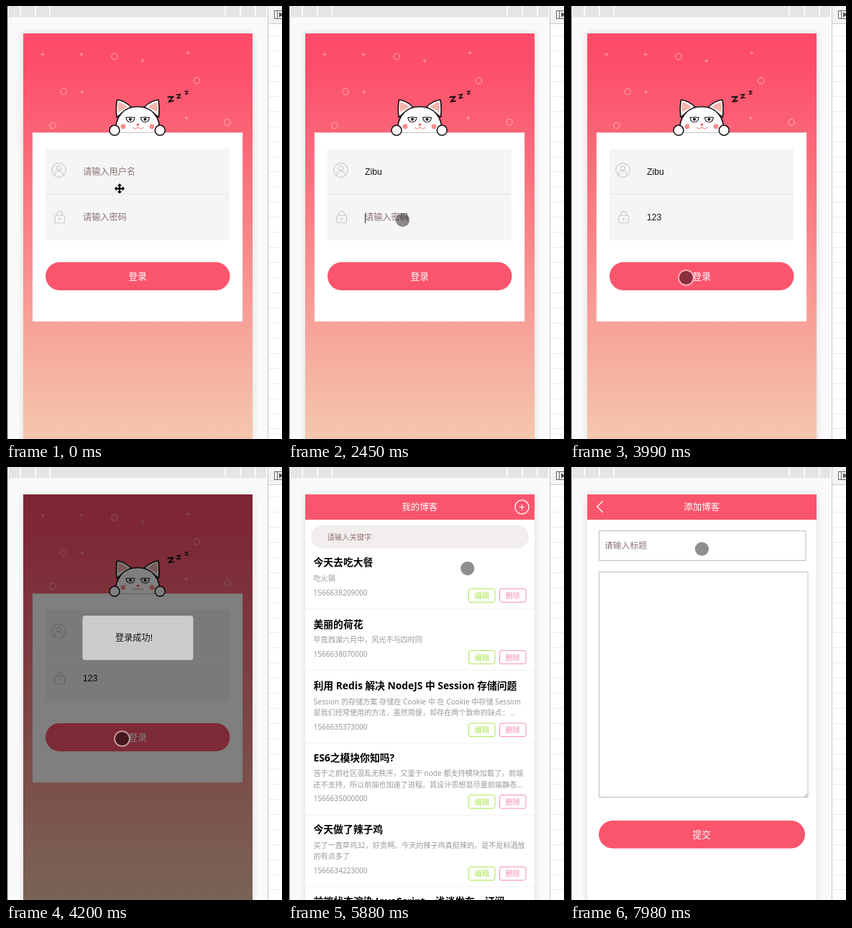
An HTML page that plays this animation: 384 by 600 pixels, repeating every 8 s.

```html
<!DOCTYPE html>
<html lang="zh-CN">
<head>
<meta charset="utf-8">
<title>登录与博客</title>
<style>
  html, body { margin: 0; width: 100%; height: 100%; overflow: hidden; background: #fafafa; }
  svg { display: block; width: 384px; height: 600px; }
  text { font-family: 'Noto Sans', 'Noto Sans CJK SC', sans-serif; white-space: pre; }
  .field { font-family: 'Liberation Sans', 'Noto Sans CJK SC', sans-serif; }
  .line { fill: none; stroke-linecap: round; stroke-linejoin: round; }
  .device { filter: drop-shadow(0 0 5px rgba(0, 0, 0, .13)); }
</style>
</head>
<body>
<svg id="stage" viewBox="0 0 384 600"></svg>
<script>
const LOOP = 8000, TICK = 70;
const RED = '#fa556d', HINT = '#8b7373';

const rect = (x, y, w, h, fill, more = '') =>
  `<rect x="${x}" y="${y}" width="${w}" height="${h}" fill="${fill}" ${more}/>`;
const line = (d, stroke, width = 1, more = '') =>
  `<path class="line" d="${d}" stroke="${stroke}" stroke-width="${width}" ${more}/>`;
const circle = (x, y, r, fill, more = '') =>
  `<circle cx="${x}" cy="${y}" r="${r}" fill="${fill}" ${more}/>`;
// Text is placed by the middle of its glyphs.
const label = (x, middle, size, fill, str, more = '') =>
  `<text x="${x}" y="${middle + size * .37}" font-size="${size}" fill="${fill}" ${more}>${str}</text>`;
const centered = (x, middle, size, fill, str) =>
  label(x, middle, size, fill, str, 'text-anchor="middle"');
const group = (id, content) => `<g id="${id}">${content}</g>`;

function frameChrome() {
  let out = rect(0, 0, 384, 600, '#fafafa') + rect(0, 0, 2, 600, '#000') + rect(4, 0, 358, 15.5, '#e5e5e5');
  for (const x of [19, 40, 60, 304, 325, 346]) out += rect(x, 0, 2, 14, '#fafafa');
  out += rect(364, 0, 20, 600, '#fff') + rect(364, 0, 20, 25, '#f3f3f3');
  for (let y = 41; y < 600; y += 20.94) out += rect(365, Math.round(y), 19, 1, '#ececec');
  out += rect(364, 24, 20, 1, '#ccc') + rect(364, 0, 1, 600, '#c8c8c8');
  out += rect(373.5, 6.5, 14, 11, 'none', 'stroke="#666"') + line('M377.5 6.5V17.5', '#666');
  out += '<path d="M380 8.5l6 3.5-6 3.5z" fill="#555"/>';
  return out + rect(24, 38, 319, 580, '#fff', 'class="device"');
}

function cat() {
  const ink = '#1c1214';
  const ear = (flip) => `<g ${flip ? 'transform="matrix(-1 0 0 1 366.5 0)"' : ''}>
    <path d="M154 154Q152.500 140 154.500 130Q165 131 174 140Z" fill="#fff" stroke="${ink}" stroke-width="1.7" stroke-linejoin="round"/>
    <path d="M156 147Q155 139 156.500 133Q163 134.500 169 140Z" fill="#f5b5ad"/></g>`;
  const eye = (x) => `<path d="M${x - 6} 154.500Q${x} 153.500 ${x + 6} 154.500Q${x + 5} 161 ${x} 161Q${x - 5} 161 ${x - 6} 154.500Z"
    fill="#fff" stroke="${ink}" stroke-width="1.100"/>` + circle(x, 157, 2, ink);
  const z = (x, y, s) => line(`M${x - s} ${y - s * .75}L${x + s} ${y - s}L${x - s * .7} ${y + s}L${x + s * 1.1} ${y + s * .7}`, ink, s * .55);
  return ear(false) + ear(true) +
    `<path d="M152.500 176C151 153 164 139.500 183.200 139.500S215.500 153 214 176Z" fill="#fff" stroke="${ink}" stroke-width="1.700"/>` +
    eye(173) + eye(193.5) +
    circle(163, 167, 3.4, '#f98d8d') + circle(203, 167, 3.4, '#f98d8d') +
    '<ellipse cx="183.500" cy="164.500" rx="2" ry="1.400" fill="#e9606b"/>' +
    line('M176.500 168.500Q180.500 172 183.500 167.500Q186.500 172 191 168.500', '#ef8f8c', 1.1) +
    z(229, 129, 3.6) + z(240, 125, 2.8) + z(251, 120, 2.2);
}

function loginPage() {
  const spark = '#ffb3b8';
  const pluses = [[51, 67], [105, 67], [190, 76], [253, 65], [106, 119], [251, 155]]
    .map(([x, y]) => line(`M${x - 2} ${y}h4M${x} ${y - 2}v4`, spark, .9)).join('');
  const rings = [[151, 70], [265.5, 103.5], [80, 118.5], [308, 161], [65, 165.5]]
    .map(([x, y]) => circle(x, y, 4.3, 'none', `stroke="${spark}"`)).join('');
  const icon = '#d3c9c9';
  return rect(24, 38, 319, 562, 'url(#dusk)') + pluses + rings + cat() +
    rect(37, 175.5, 292, 261.5, '#fff', 'stroke="#f1dfdf" stroke-width=".5"') +
    circle(151, 172.3, 7, '#fff', 'stroke="#1c1214" stroke-width="1.6"') +
    circle(214.3, 172.3, 7, '#fff', 'stroke="#1c1214" stroke-width="1.6"') +
    rect(55, 198, 256, 126.5, '#f5f5f5') + rect(55, 260, 256, 1, '#e8e8e8') +
    circle(73.5, 227.5, 9.8, 'none', `stroke="${icon}" stroke-width="1.2"`) +
    circle(73.5, 224.6, 3.1, 'none', `stroke="${icon}" stroke-width="1.2"`) +
    line('M67.800 234.500C68 230 70 228.500 73.500 228.500S79 230 79.200 234.500', icon, 1.2) +
    rect(68, 290, 13.5, 10.5, 'none', `stroke="${icon}" stroke-width="1.2" rx="1"`) +
    line('M71 290v-2a3.700 3.700 0 0 1 7.400 0v2M74.700 294v3M73.500 294h2.500', icon, 1.2) +
    label(107, 229.5, 12.2, HINT, '', 'id="user" class="field"') +
    label(107, 292.5, 12.2, HINT, '', 'id="pass" class="field"') +
    rect(55, 355, 256.5, 39, RED, 'rx="19.5"') + centered(183.2, 374.5, 12.7, '#fff', '登录') +
    rect(107, 222, 1, 14, '#222', 'id="caret"') + rect(107, 235, 8, 1, '#222', 'id="underline"');
}

const toast = () => rect(24, 38, 319, 562, '#000', 'opacity=".5"') +
  rect(106.5, 206, 154, 61.5, '#ccc', 'rx="3.5"') + label(152, 236.5, 12.2, '#111', '登录成功!');

const header = (title) => rect(24, 38, 319, 35, RED) + centered(183.2, 55.5, 12.5, '#fff', title);

const blogPage = () => rect(24, 38, 319, 562, '#fff') + header('我的博客') +
  circle(325.5, 55.5, 9.6, 'none', 'stroke="#fff" stroke-width="1.3"') +
  line('M322 55.500h7M325.500 52v7', '#fff', 1.2) +
  rect(32, 80.5, 303, 32.5, '#f3eeee', 'rx="16.25"') + label(54.5, 97, 10.3, HINT, '请输入关键字');

const posts = [
  [132, '今天去吃大餐', ['吃火锅'], '1566638209000'],
  [217.5, '美丽的荷花', ['毕竟西湖六月中，风光不与四时同'], '1566638070000'],
  [303, '利用 Redis 解决 NodeJS 中 Session 存储问题',
    ['Session 的存储方案 存储在 Cookie 中 在 Cookie 中存储 Session', '是我们经常使用的方法，虽然简便，却存在两个致命的缺点：…'], '1566635373000'],
  [402.5, 'ES6之模块你知吗?',
    ['苦于之前社区混乱无秩序，又鉴于 node 都支持模块加载了，前端', '还不支持，所以前端也加速了进程。其设计思想是尽量前端静态…'], '1566635000000'],
  [502, '今天做了辣子鸡',
    ['买了一直草鸡32，好贵啊。今天的辣子鸡真挺辣的，是不是料酒放', '的有点多了'], '1566634223000'],
  [602, '前端状态渲染 JavaScript，浅谈发布、订阅', [], ''],
];

function post([y, title, lines, stamp]) {
  const end = y + 26.5 + lines.length * 15.3;
  const button = (x, color, str) =>
    rect(x, end - 5, 36.5, 18.5, '#fff', `rx="2.5" stroke="${color}"`) + centered(x + 18.3, end + 4.5, 10.3, color, str);
  return label(35.5, y, 13.8, '#000', title, 'font-weight="700"') +
    lines.map((str, i) => label(35.5, y + 21.8 + i * 15.6, 10.1, '#999', str)).join('') +
    label(35.5, end, 10.1, '#999', stamp) +
    button(251.5, '#a8e84f', '编辑') + button(294.5, '#f58fb0', '删除') +
    rect(24, Math.round(end + 22), 319, 1, '#f3f3f3');
}

const addPage = () => rect(24, 38, 319, 562, '#fff') + header('添加博客') +
  line('M45.500 47.500L37.800 55L45.500 62.500', '#fff', 1.3) +
  rect(40.5, 88.5, 287.5, 41, '#fff', 'stroke="#bdbdbd"') + label(48, 109, 11.8, HINT, '请输入标题') +
  rect(40.5, 145.5, 290.5, 312, '#fff', 'stroke="#bdbdbd"') + line('M326.500 456.500l3.500-3.500M329 456.500l1-1', '#777', .8) +
  rect(40, 490, 287, 38.5, RED, 'rx="19.25"') + centered(183.3, 509.5, 12.7, '#fff', '提交');

const ime = () => rect(107.5, 239.5, 118, 102, '#fff', 'id="imeBox" stroke="#c8c8c8"') +
  ['字', '自', '子', '资', '紫'].map((c, i) => label(114, 251 + i * 20, 12.5, i ? '#333' : '#2a6fc9', `${i + 1} ${c}`)).join('');

const pointer = () => group('touch', circle(0, 0, 9.6, '#000', 'opacity=".44"') +
    circle(0, 0, 10.4, 'none', 'id="press" stroke="#fff" stroke-opacity=".55" stroke-width="1.8"')) +
  group('grab', ['#fff', '#000'].map((color, i) =>
    [0, 90, 180, 270].map(a => `<path transform="translate(158 253) rotate(${a})" d="M-1 0V-4H-3L0-7L3-4H1V0Z"
      fill="${color}" stroke="${color}" stroke-width="${i ? .3 : 2}"/>`).join('')).join(''));

const stage = document.getElementById('stage');
stage.innerHTML = `<defs><linearGradient id="dusk" x1="0" y1="0" x2="0" y2="1">
    <stop offset="0" stop-color="#fe4b69"/><stop offset=".08" stop-color="#fd4e6b"/><stop offset="1" stop-color="#f4c7ad"/>
  </linearGradient></defs>` + frameChrome() +
  group('login', loginPage()) + group('toast', toast()) +
  group('blog', blogPage() + group('list', posts.map(post).join(''))) +
  group('add', addPage()) + group('ime', ime()) + pointer();

const el = {};
stage.querySelectorAll('[id]').forEach(node => { el[node.id] = node; });
const show = (id, on) => { el[id].style.display = on ? '' : 'none'; };
const within = (t, a, b) => t >= a && t < b;
const latest = (table, t) => table.filter(row => row[0] <= t).pop();

// [time, user name, password]
const typing = [[0, '', ''], [210, 'Z', ''], [840, 'Zi', ''], [980, 'Zib', ''], [1120, 'Zibu', ''],
  [3010, 'Zibu', '1'], [3220, 'Zibu', '12'], [3430, 'Zibu', '123']];
// [time, visible]
const blink = [[0, 0], [140, 1], [560, 0], [840, 1], [1820, 0], [2240, 1], [2870, 0], [3010, 1], [3920, 0]];
// [start, steps, x, y]
const moves = [[2100, 3, 159.5, 296.5], [3710, 4, 161.5, 376.5], [5460, 9, 262.5, 106.5], [6160, 1, 263, 107],
  [6580, 6, 325, 61.5], [7630, 4, 184.5, 112.5], [7980, 1, 183.5, 113.5]];

function pointerAt(t) {
  let x = 158, y = 253;
  for (const [start, steps, toX, toY] of moves) {
    if (t < start) break;
    const k = Math.min(1, (Math.floor((t - start) / TICK) + 1) / steps);
    const eased = k * k * (3 - 2 * k);
    x += (toX - x) * eased;
    y += (toY - y) * eased;
  }
  return [x, y];
}

function setField(node, value, hint) {
  const str = value || hint;
  if (node.textContent !== str) node.textContent = str;
  node.setAttribute('fill', value ? '#111' : HINT);
  return value ? node.getComputedTextLength() : 0;
}

function render(t) {
  show('login', t < 5110);
  show('toast', within(t, 4200, 5110));
  show('blog', within(t, 5110, 7350));
  show('list', t >= 5180);
  show('add', t >= 7350);

  if (t < 5110) {
    const [, user, pass] = latest(typing, t);
    const userWidth = setField(el.user, user, '请输入用户名');
    const passWidth = setField(el.pass, pass, '请输入密码');
    const inPass = t >= 2450;
    el.caret.setAttribute('x', Math.round(107 + (inPass ? passWidth : userWidth)));
    el.caret.setAttribute('y', inPass ? 287 : 222);
    show('caret', latest(blink, t)[1]);
    el.underline.setAttribute('width', userWidth);
  }
  const composing = within(t, 210, 1330);
  show('underline', composing);
  show('ime', composing);
  el.imeBox.setAttribute('width', t < 840 ? 118 : t < 1120 ? 290 : 164);

  const [x, y] = pointerAt(t);
  el.touch.setAttribute('transform', `translate(${x} ${y})`);
  show('touch', t >= 140);
  show('grab', t < 140);
  show('press', within(t, 3990, 5110) || within(t, 7000, 7630));
}

const began = performance.now();
function tick() {
  render((performance.now() - began) % LOOP);
  requestAnimationFrame(tick);
}
tick();
</script>
</body>
</html>
```
